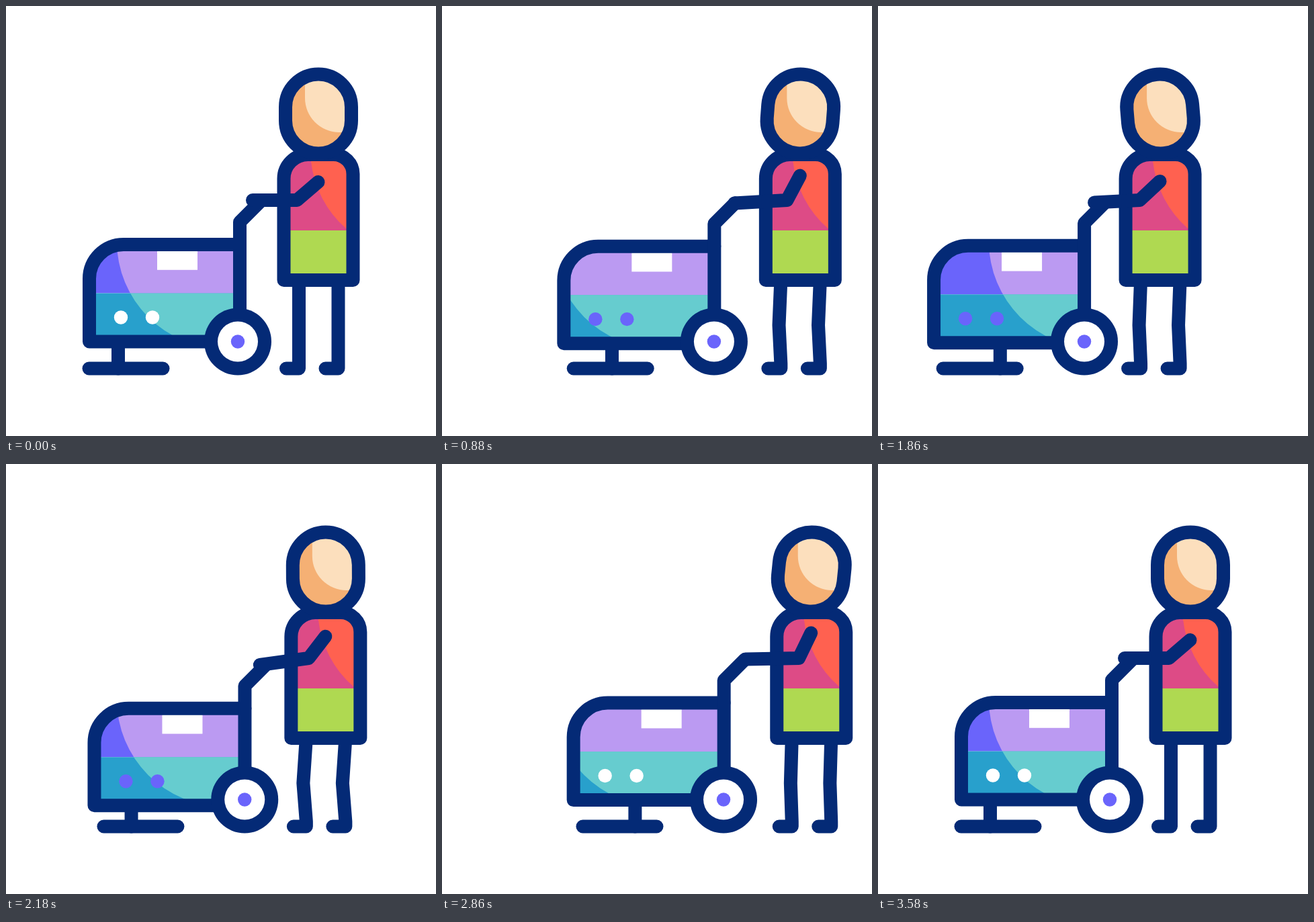
These frames come from a looping animation (640 px wide and 640 px high, 3600 ms). An HTML page with a canvas:

```html
<!DOCTYPE html>
<html lang="en">
<head>
<meta charset="utf-8">
<title>Floor cleaner</title>
<style>
  html, body { margin: 0; width: 100%; height: 100%; overflow: hidden; background: #fff; }
  canvas { display: block; width: 640px; height: 640px; }
</style>
</head>
<body>
<canvas id="stage"></canvas>
<script>
const LOOP = 3600, END = 3580, STEP = 20;
const C = {
  navy: '#042a76', violet: '#6a64fb', lilac: '#bb9af2', blue: '#28a0cc', teal: '#66cccf',
  pink: '#dd4b86', red: '#ff6150', green: '#afd951', skin: '#f5b074', light: '#fcdfbd', white: '#fff'
};

const canvas = document.getElementById('stage');
const ctx = canvas.getContext('2d');
const dpr = window.devicePixelRatio || 1;
canvas.width = canvas.height = 640 * dpr;

// Travel right, left, right and home; the scrubbing foot has its own stroke.
const TRAVEL = [0, 650, 1640, 2755, END];
const SCRUB = [0, 600, 1200, 1800, 2400, 3000, END];

const ease = s => s * s * (3 - 2 * s);

function locate(t, times) {
  let i = 0;
  while (i < times.length - 2 && t >= times[i + 1]) i++;
  return [i, Math.min(1, (t - times[i]) / (times[i + 1] - times[i]))];
}

function track(t, times, values) {
  const [i, s] = locate(t, times);
  return values[i] + (values[i + 1] - values[i]) * ease(s);
}

const swing = (t, right, left) => track(t, TRAVEL, [0, right, left, right, 0]);

// Rises to 1 halfway through each leg of the trip.
function bump(t) {
  const s = locate(t, TRAVEL)[1];
  return ease(1 - Math.abs(2 * s - 1));
}

function group(x, y, draw) {
  ctx.save();
  ctx.translate(x, y);
  draw();
  ctx.restore();
}

function line(d) {
  ctx.strokeStyle = C.navy;
  ctx.stroke(new Path2D(d));
}

function shape(d, color) {
  ctx.fillStyle = color;
  ctx.fill(new Path2D(d));
}

function rect(x, y, w, h, color) {
  ctx.fillStyle = color;
  ctx.fillRect(x, y, w, h);
}

function disc(x, y, r, color) {
  ctx.fillStyle = color;
  ctx.beginPath();
  ctx.arc(x, y, r, 0, 2 * Math.PI);
  ctx.fill();
}

const HULL = 'M348 355H175A51 51 0 0 0 124 406V499.5H';
const TORSO = 'M413.5 408V257A36 36 0 0 1 449.5 221H487.5A29 29 0 0 1 516.5 250V408Z';
const FACE = 'M-49 -10A49 49 0 0 1 49 -10V10A49 49 0 0 1 -49 10Z';

function machine(t) {
  const x = swing(t, 75, -54);
  const y = 8.8 * bump(t) ** 1.5;
  const brush = 178.5 + swing(t, 90, -40);
  const stem = brush + track(t, SCRUB, [-11.5, 32, -34, 32, -34, 32, -11.5]);
  const lamp = Math.floor(t / 600) % 2 && t < END ? C.violet : C.white;

  line(`M${stem} 508V539.5`);
  line(`M${brush - 55} 539.5h110`);

  group(x, y, () => {
    ctx.save();
    ctx.clip(new Path2D(HULL + '348Z'));
    rect(120, 350, 230, 77.5, C.violet);
    rect(120, 427.5, 230, 75, C.blue);
    // The highlight stays in place while the hull moves through it.
    ctx.beginPath();
    ctx.arc(324 - x, 350.5 - y, 159, 0, 2 * Math.PI);
    ctx.rect(324 - x, 300 - y, 260, 260);
    ctx.clip();
    rect(120, 350, 230, 77.5, C.lilac);
    rect(120, 427.5, 230, 75, C.teal);
    ctx.restore();

    rect(225, 360, 60, 32.8, C.white);
    disc(171, 463.5, 10.2, lamp);
    disc(218, 463.5, 10.2, lamp);
    line(HULL + '312');
    line('M348 470V321.5L379 290.5');
  });

  const wheel = 345 + swing(t, 77.5, -51);
  disc(wheel, 499.5, 50, C.navy);
  disc(wheel, 499.5, 30, C.white);
  disc(wheel, 499.5, 10.2, C.violet);
}

function person(t) {
  const lift = bump(t);
  const knee = track(t, TRAVEL, [0, 1.5, 1.5, 1.5, 0]) + 3 * lift;
  const bend = swing(t, 14, 0);
  const raise = swing(t, 11, 0);
  const tilt = swing(t, 6, -6) * Math.PI / 180;

  group(swing(t, 88.7, -60), 0, () => {
    for (const x of [436, 494.5]) {
      line(`M${x} 408L${x - knee} 475L${x} 532V539.5H${x - 19}`);
    }

    ctx.save();
    ctx.clip(new Path2D(TORSO));
    rect(405, 215, 120, 119, C.red);
    shape('M400 215H453.5L454 231A155 155 0 0 0 506 331L511 334H400Z', C.pink);
    rect(405, 334, 120, 80, C.green);
    ctx.restore();
    line(TORSO);

    group(465, 160.5, () => {
      ctx.save();
      ctx.rotate(tilt);
      ctx.clip(new Path2D(FACE));
      ctx.rotate(-tilt);
      rect(-70, -70, 140, 140, C.skin);
      shape('M-20 -70V-23.5A51 51 0 0 0 31 27.5H70V-70Z', C.light);
      ctx.restore();
      ctx.rotate(tilt);
      line(FACE);
    });

    line(`M464.5 ${262 - raise}L${433 + bend} 289L367 ${289 + 10 * lift}`);
  });
}

function frame(now) {
  const t = Math.min(END, Math.floor(now % LOOP / STEP) * STEP);
  ctx.setTransform(dpr, 0, 0, dpr, 0, 0);
  rect(0, 0, 640, 640, C.white);
  ctx.lineWidth = 20;
  ctx.lineCap = ctx.lineJoin = 'round';
  machine(t);
  person(t);
  requestAnimationFrame(frame);
}

frame(performance.now());
</script>
</body>
</html>
```
